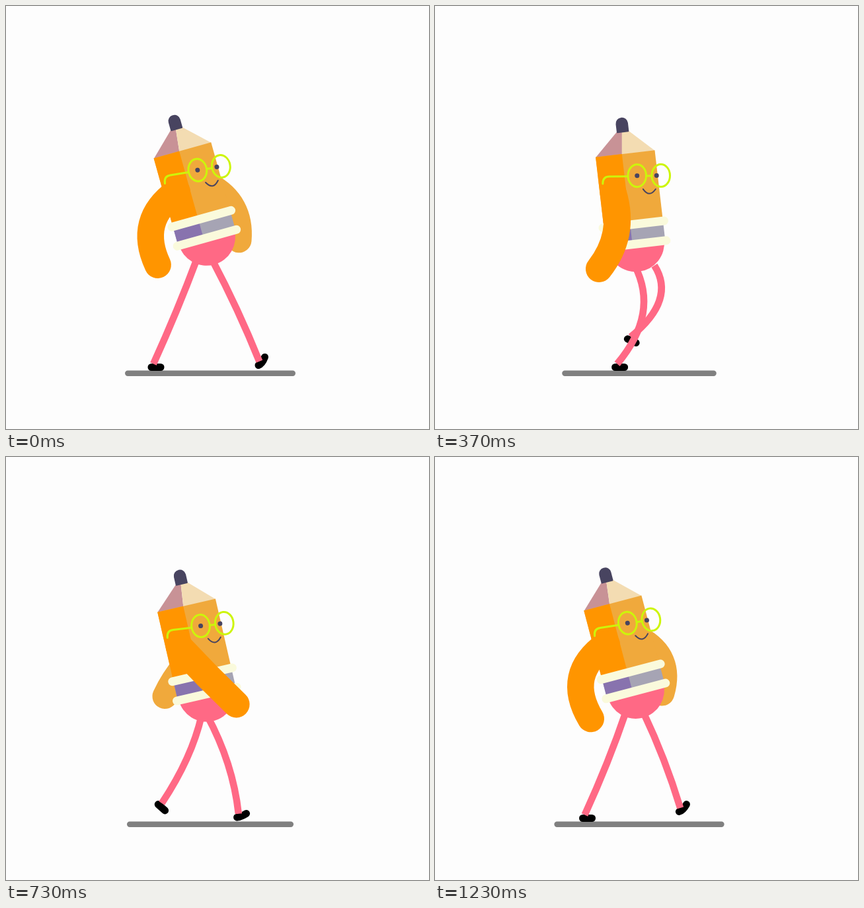
An HTML page with a canvas for the animation above (1.26 s loop, 640 by 640 pixels).

```html
<!DOCTYPE html>
<html lang="en">
<head>
<meta charset="utf-8">
<title>Walking pencil</title>
<style>
  html, body { margin: 0; height: 100%; overflow: hidden; background: #fdfdfd; }
  canvas { display: block; width: 640px; height: 640px; }
</style>
</head>
<body>
<canvas id="stage" width="640" height="640"></canvas>
<script>
const ctx = document.getElementById('stage').getContext('2d');
const LOOP = 1260, STRIDE = 38, PACE = 19;
const C = {
  bg: '#fdfdfd', dark: '#ff9500', light: '#f0a93c', woodDark: '#c89296', wood: '#f3dcb2',
  lead: '#484460', band: '#fafadc', purple: '#8873ae', grey: '#a6a4b4',
  skin: '#ff6985', rim: '#cdf50a', ground: '#808080'
};

const rad = d => d * Math.PI / 180;
// Cosine wave that peaks at the given step.
const wave = (step, period, peak = 0) => Math.cos(2 * Math.PI * (step - peak) / period);

function poly(color, ...p) {
  ctx.beginPath();
  for (let i = 0; i < p.length; i += 2) ctx.lineTo(p[i], p[i + 1]);
  ctx.closePath();
  ctx.fillStyle = color;
  ctx.fill();
}

function box(color, x, y, w, h, r = 0) {
  ctx.beginPath();
  ctx.roundRect(x, y, w, h, r);
  ctx.fillStyle = color;
  ctx.fill();
}

function curve(color, width, x0, y0, cx, cy, x1, y1) {
  ctx.beginPath();
  ctx.moveTo(x0, y0);
  ctx.quadraticCurveTo(cx, cy, x1, y1);
  ctx.strokeStyle = color;
  ctx.lineWidth = width;
  ctx.stroke();
}

function oval(x, y, rx, ry) {
  ctx.beginPath();
  ctx.ellipse(x, y, rx, ry, 0, 0, 2 * Math.PI);
}

// The body rocks once per pace around the middle of the eraser.
function bodyPose(step) {
  const quarter = PACE / 4;
  return {
    x: 303.5,
    y: 359.2 - 2.8 * wave(step, PACE) - 3.2 * wave(step, PACE, quarter)
      - 7.1 * wave(step, PACE / 2) - 0.8 * wave(step, PACE / 2, quarter / 2),
    tilt: 10.2 + 4.2 * wave(step, PACE) + 1.1 * wave(step, PACE, quarter)
      + 1.2 * wave(step, PACE / 2)
  };
}

// The hand swings once per stride; the elbow bends ahead of it.
function drawArm(step, color, width, [sx, sy], handX, bend, handY) {
  const x = handX - 66 * wave(step, STRIDE, 4.2) + 4.5 * wave(step, PACE, 4.2);
  const y = handY(step);
  const bow = (bend - 50 * wave(step, STRIDE, 33)) / Math.hypot(x - sx, y - sy);
  curve(color, width, sx, sy,
    (sx + x) / 2 + bow * (y - sy), (sy + y) / 2 - bow * (x - sx), x, y);
}

// Heel strikes at step 0, slides back for one pace, then swings forward.
function footPose(step) {
  const strike = wave(step, 2 * STRIDE) ** 26;
  const foot = { x: 220, y: 546.5 - 3 * strike, angle: -18 * strike, curl: 52 * strike };
  const u = (step % PACE) / PACE;
  if (step < PACE) {
    foot.x += 162 * (1 - u) ** 1.3;
  } else {
    foot.x += 162 * u ** 1.5;
    foot.y -= 44 * Math.sin(Math.PI * u);
    foot.angle += 42 * Math.sin(Math.PI * u ** 0.4);
  }
  return foot;
}

function drawLeg(step, hipY) {
  const { x, y, angle, curl } = footPose(step);
  const c = Math.cos(rad(angle)), s = Math.sin(rad(angle));
  const toe = 8 + curl * 0.06, toeAngle = rad(angle - curl);
  const mx = x + 6 * c, my = y + 6 * s;
  curve('#000', 11, x, y, mx, my, mx + toe * Math.cos(toeAngle), my + toe * Math.sin(toeAngle));

  const hipX = 308 + 17 * wave(step, STRIDE, 33) - 9 * wave(step, PACE, 1.5);
  const ankleX = x + 3 * c + 5 * s, ankleY = y + 3 * s - 5 * c;
  const knee = 29 - 25 * wave(step, PACE);
  ctx.lineCap = 'butt';
  curve(C.skin, 10.5, hipX, hipY, (hipX + ankleX) / 2 + knee, (hipY + ankleY) / 2 - 2, ankleX, ankleY);
  ctx.lineCap = 'round';
}

function drawBody() {
  poly(C.woodDark, 0, 0.5, 36, -34, 44, -34, 40, 0.5);
  poly(C.wood, 40, 0.5, 44, -34, 54, -34, 90, 0.5);
  box(C.lead, 36, -55, 18.5, 22.5, [9, 9, 1, 1]);
  box(C.light, 0, 0, 90, 112);
  box(C.dark, 0, 0, 40, 112);

  ctx.beginPath();
  ctx.arc(45, 136, 43.5, 0, Math.PI);
  ctx.fillStyle = C.skin;
  ctx.fill();
  box(C.grey, 0, 112, 90, 22);
  box(C.purple, 0, 112, 40, 22);
  for (const y of [101, 131]) box(C.band, -8, y, 106, 13, 6.5);
}

function drawFace(step) {
  const open = Math.min(1, Math.max(0.3, Math.abs(step - 16.5) / 3));
  ctx.translate(59, 35);
  ctx.rotate(rad(6.3));
  ctx.fillStyle = C.lead;
  for (const x of [0, 29.5]) {
    oval(x, 0, 3.5, 3.5 * open);
    ctx.fill();
  }
  curve(C.lead, 2, 9, 20.5, 18.5, 34, 28, 20.5);
  ctx.strokeStyle = C.rim;
  ctx.lineWidth = 3;
  for (const x of [0, 36]) {
    oval(x, 0, 13.8, 17);
    ctx.stroke();
  }
  ctx.beginPath();
  ctx.moveTo(14, 0.5);
  ctx.lineTo(22, 0.5);
  ctx.moveTo(-14, 1);
  ctx.lineTo(-42, 1);
  ctx.quadraticCurveTo(-52, 1, -52, 12);
  ctx.stroke();
}

function draw(step) {
  const other = (step + PACE) % STRIDE;
  const { x, y, tilt } = bodyPose(step);
  const c = Math.cos(rad(tilt)), s = Math.sin(rad(tilt));
  const toStage = (u, v) => [x + (u - 45) * c + (v - 136) * s, y - (u - 45) * s + (v - 136) * c];
  const onBody = paint => {
    ctx.save();
    ctx.translate(x, y);
    ctx.rotate(-rad(tilt));
    ctx.translate(-45, -136);
    paint(step);
    ctx.restore();
  };

  ctx.fillStyle = C.bg;
  ctx.fillRect(0, 0, 640, 640);
  ctx.lineCap = 'round';

  const half = 122.5 + 6.5 * wave(step, PACE);
  box(C.ground, 309 - half, 551.5, 2 * half, 8.5, 4.2);

  drawArm(other, C.light, 38, toStage(70, 62), 301, -3, () => y + 5);
  drawLeg(other, y + 34);
  drawLeg(step, y + 34);
  onBody(drawBody);
  drawArm(step, C.dark, 40.5, toStage(20.3, 58), 279.5, -14, n =>
    y + 33.5 + 10.5 * wave(n, STRIDE, 4.2) - 6 * wave(n, PACE, 4.2) - 3 * wave(n, STRIDE, 13.7));
  onBody(drawFace);
}

// Thirty poses a second, on a clock of 10 ms ticks.
function tick() {
  const t = performance.now() % LOOP;
  draw(Math.floor((Math.floor(t / 10) * 10 + 5) * 0.03) % STRIDE);
  requestAnimationFrame(tick);
}
tick();
</script>
</body>
</html>
```
